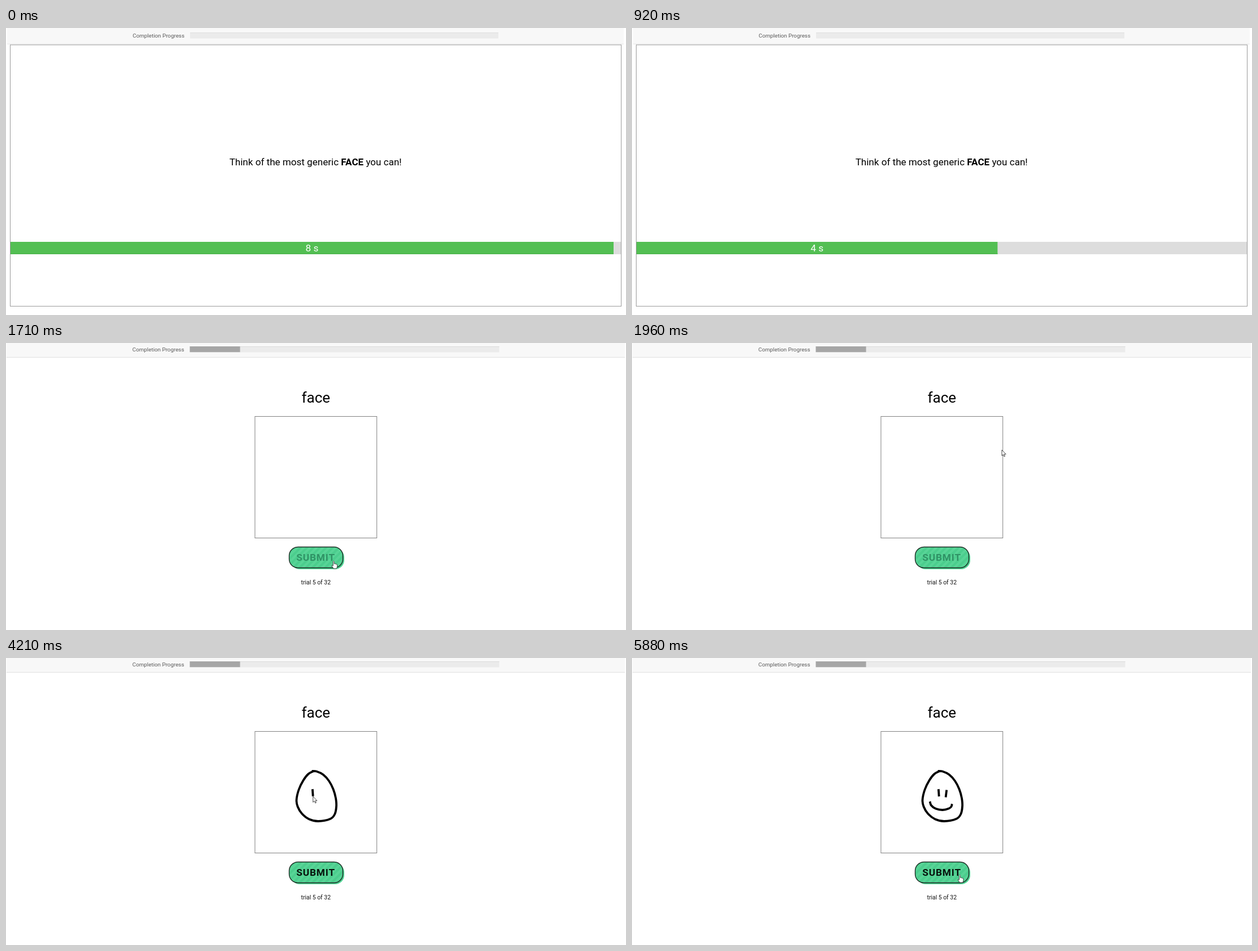
These frames come from a looping animation (1098x510 px, 6.33 s). An HTML page:

```html
<!DOCTYPE html>
<html lang="en">
<head>
<meta charset="utf-8">
<title>Drawing task</title>
<style>
  html, body { margin: 0; width: 100%; height: 100%; overflow: hidden; background: #fff; }
  svg { display: block; width: 100vw; height: 100vh; font-family: Roboto, sans-serif; }
  .label { font-size: 9.8px; fill: #5a5a5a; }
  .mid { text-anchor: middle; }
  .pen { fill: none; stroke: #000; stroke-width: 3.8; stroke-linejoin: round; }
  .pointer { fill: #fff; stroke: #333; stroke-width: 0.9; stroke-linejoin: round; }
</style>
</head>
<body>
<svg viewBox="0 0 1098 510">
  <defs>
    <pattern id="stripes" width="8" height="8" patternUnits="userSpaceOnUse" patternTransform="rotate(45)">
      <rect width="8" height="8" fill="#58d497"/>
      <rect width="4" height="8" fill="#4bcd8d"/>
    </pattern>
  </defs>

  <g id="intro">
    <rect x="2" width="1092" height="28" fill="#f8f8f8"/>
    <rect x="2" y="28" width="1092" height="1" fill="#e7e7e7"/>
    <text class="label" x="224.3" y="17.2">Completion Progress</text>
    <rect x="326" y="8" width="546" height="10.5" fill="#ebebeb"/>
    <rect x="326" y="8" width="546" height="1" fill="#dedede"/>
    <rect x="7.5" y="30" width="1082" height="464.4" fill="#fff" stroke="#999"/>
    <text class="mid" x="548.2" y="244.2" font-size="17.07">Think of the most generic <tspan font-weight="700">FACE</tspan> you can!</text>
    <rect x="8" y="380" width="1081" height="22" fill="#ddd"/>
    <rect id="bar" x="8" y="380" height="22" fill="#53bf53"/>
    <rect id="shade" x="8" y="400.5" height="1.5" fill="#4db54d"/>
    <text id="secs" class="mid" y="397" font-size="17.2" fill="#fff"></text>
  </g>

  <g id="trial">
    <rect x="1" width="1095" height="25" fill="#f8f8f8"/>
    <rect x="1" y="25" width="1095" height="1" fill="#e0e0e0"/>
    <text class="label" x="223.8" y="15.2">Completion Progress</text>
    <rect x="325.5" y="6" width="548" height="10.5" fill="#ebebeb"/>
    <rect x="325.5" y="6" width="548" height="1" fill="#dadada"/>
    <rect x="325.5" y="6" width="89" height="10.2" fill="#a6a6a6"/>
    <text class="mid" x="548.8" y="105.7" font-size="26">face</text>
    <rect x="440.9" y="130.5" width="215.8" height="216" fill="#fff" stroke="#808080"/>
    <rect x="504" y="365" width="95" height="37" rx="16" fill="#4fd393"/>
    <rect x="501.5" y="362.5" width="95" height="37" rx="15.5" fill="url(#stripes)" stroke="#1c2b23" stroke-width="1.4"/>
    <text id="submit" class="mid" x="548.6" y="387" font-size="17.2" font-weight="700" letter-spacing="0.9">SUBMIT</text>
    <text class="mid" x="548.8" y="429" font-size="10.4" fill="#111">trial 5 of 32</text>
    <g id="ink"></g>
    <path id="arrow" class="pointer" d="M0 0V10.3L2.4 8.2 4 11.8 5.6 11.1 4.1 7.6H7.2Z"/>
    <path id="hand" class="pointer" d="M-1 1Q0-1 1 1V5Q2.2 4.2 3 5.4Q4.2 4.8 4.9 6Q6.4 5.6 6.4 7.4V10Q6 12 5 13.6H-.4Q-1 11.6-3.6 8.4Q-3.4 6.8-1 8.6Z"/>
  </g>
</svg>

<script>
const LOOP = 6330, END = 5875, CUT = 1700, FPS = 24 / 1000;
const HOLD = 114, SECOND = 250, SECS = 8, FULL = 1068;
const READY = 3900;
const $ = id => document.getElementById(id);
const clamp = v => Math.min(1, Math.max(0, v));
const smooth = p => p * p * (3 - 2 * p);

// Catmull-Rom curve through "x,y x,y ..." as path data
function curve(text) {
  const p = text.split(' ').map(s => s.split(',').map(Number));
  let d = 'M' + p[0];
  for (let i = 0; i < p.length - 1; i++) {
    const a = p[i - 1] || p[i], b = p[i], c = p[i + 1], e = p[i + 2] || c;
    const c1 = b.map((v, k) => v + (c[k] - a[k]) / 6);
    const c2 = c.map((v, k) => v - (e[k] - b[k]) / 6);
    d += `C${c1} ${c2} ${c}`;
  }
  return d;
}

function leg(start, end, d, pen) {
  const path = document.createElementNS('http://www.w3.org/2000/svg', 'path');
  path.setAttribute('d', d);
  if (pen) {
    path.setAttribute('class', 'pen');
    $('ink').append(path);
  }
  return { start, end, path, pen, len: path.getTotalLength() };
}

const move = (start, end, d) => leg(start, end, d, false);
const draw = (start, end, points) => leg(start, end, curve(points), true);

const legs = [
  move(CUT, 1950, 'M580 388C600 330 640 250 655 190'),
  move(2030, 2680, 'M655 190C640 182 575 186 541 201'),
  draw(2840, 3880, '541.5,201 550,201.5 562,207.5 572,218.5 579.5,233 584,249 585,264 582,278 574,286 ' +
    '553,290 537,286.5 524,276.5 516.5,264 514.5,252 518.5,234 526.5,217.5 535.5,206 545,201'),
  move(3900, 4070, 'M545 201L543 233'),
  draw(4080, 4215, '542.8,233 543.7,246'),
  move(4260, 4410, 'M543.5 246L557 234'),
  draw(4420, 4560, '557.2,234.5 555.6,247.5'),
  move(4570, 4715, 'M555.8 247.5L527.5 255'),
  draw(4740, 5310, '527.5,255 530,262 538,267.8 550,270 561,267.5 565.5,264 566.7,259.3'),
  move(5360, 5870, 'M566.5 260C600 300 650 380 634 420S600 420 580.5 385.5')
];

function countdown(t) {
  const left = Math.max(0, SECS - Math.max(0, t - HOLD) / SECOND);
  const width = FULL * left / SECS;
  $('bar').setAttribute('width', width);
  $('shade').setAttribute('width', width);
  $('secs').setAttribute('x', 8 + width / 2);
  $('secs').textContent = Math.floor(left) + ' s';
}

function sketch(t) {
  let spot = { x: 0, y: 0 };
  for (const { start, end, path, pen, len } of legs) {
    const p = clamp((t - start) / (end - start));
    const at = len * (pen ? p : smooth(p));
    if (pen) {
      path.style.display = p > 0 ? '' : 'none';
      path.style.strokeDasharray = p < 1 ? `${at} 999` : 'none';
    }
    // the pointer runs slightly ahead of the ink
    if (t >= start) spot = path.getPointAtLength(pen ? Math.min(len, at + 3) : at);
  }
  const over = spot.x > 501 && spot.x < 597 && spot.y > 362 && spot.y < 400;
  $('hand').style.display = over ? '' : 'none';
  $('arrow').style.display = over ? 'none' : '';
  for (const id of ['hand', 'arrow']) $(id).setAttribute('transform', `translate(${spot.x} ${spot.y})`);
  $('submit').setAttribute('fill', t < READY ? '#2f9265' : '#07110c');
}

function render(ms) {
  const t = Math.min(END, Math.floor((ms % LOOP + 6) * FPS) / FPS);
  const intro = t < CUT;
  $('intro').style.display = intro ? '' : 'none';
  $('trial').style.display = intro ? 'none' : '';
  if (intro) countdown(t);
  else sketch(t);
}

const began = performance.now();
function tick() {
  render(performance.now() - began);
  requestAnimationFrame(tick);
}
tick();
</script>
</body>
</html>
```
